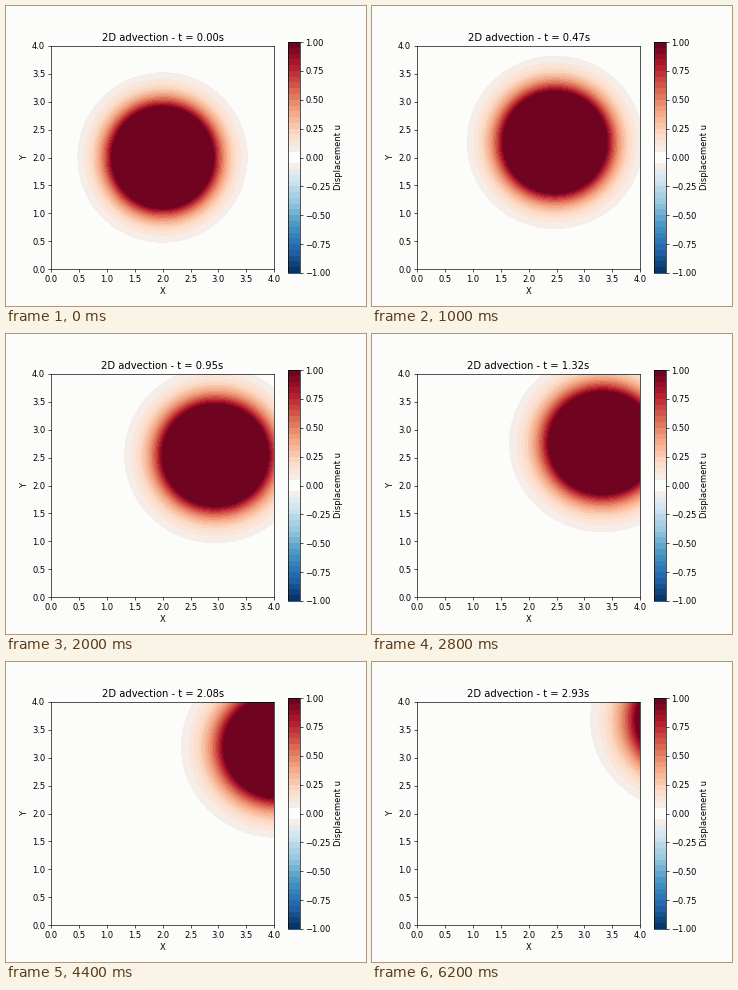
Recreate the animation shown at these times as a matplotlib script. Size 360 px wide and 300 px high, loop 6400 ms.

```python
import numpy as np
import matplotlib.pyplot as plt
from matplotlib.animation import FuncAnimation
from matplotlib.colors import ListedColormap

FRAMES, INTERVAL = 32, 200
DT = 0.09455                    # simulated seconds per frame
SIZE = 4.0
CENTER = 2.0
AMPLITUDE, VARIANCE = 5.0, 0.25
VELOCITY = (1.0, 0.575)
DIFFUSION = (0.024, 0.0135)     # smearing of the advected pulse per axis
BACKGROUND = "#fcfcfb"
PALE = "#f6ede8"

levels = np.linspace(-1, 1, 41)
band_middles = (levels[:-1] + levels[1:]) / 2
colors = plt.get_cmap("RdBu_r")((band_middles + 1) / 2)
for band, color in ((18, PALE), (19, BACKGROUND), (20, BACKGROUND), (21, PALE)):
    colors[band] = plt.matplotlib.colors.to_rgba(color)
cmap = ListedColormap(colors)

axis = np.linspace(0, SIZE, 161)
X, Y = np.meshgrid(axis, axis)


def displacement(t):
    """Gaussian pulse that drifts and slowly spreads, clipped to the scale."""
    peak, exponent = AMPLITUDE * VARIANCE, 0
    for grid, speed, spread in zip((X, Y), VELOCITY, DIFFUSION):
        variance = VARIANCE + 2 * spread * t
        peak /= np.sqrt(variance)
        exponent = exponent + (grid - CENTER - speed * t) ** 2 / (2 * variance)
    return np.clip(peak * np.exp(-exponent), 1e-9, 0.9999)


def draw_field(t):
    return ax.contourf(X, Y, displacement(t), levels=levels, cmap=cmap,
                       vmin=-1, vmax=1)


plt.rcParams["font.family"] = "DejaVu Sans"
fig, ax = plt.subplots(figsize=(6, 5), dpi=60, facecolor=BACKGROUND)
ax.set_facecolor(BACKGROUND)
ax.set_aspect("equal")
ax.set_xlabel("X")
ax.set_ylabel("Y")
field = draw_field(0)
fig.colorbar(field, ax=ax, label="Displacement u",
             ticks=np.linspace(-1, 1, 9))


def update(frame):
    global field
    t = frame * DT
    field.remove()
    field = draw_field(t)
    ax.set_xlim(0, SIZE)
    ax.set_ylim(0, SIZE)
    ax.set_title(f"2D advection - t = {t:.2f}s")
    return []


animation = FuncAnimation(fig, update, frames=FRAMES, interval=INTERVAL,
                          init_func=lambda: update(0), repeat=True,
                          repeat_delay=0, blit=False)
plt.show()
```
